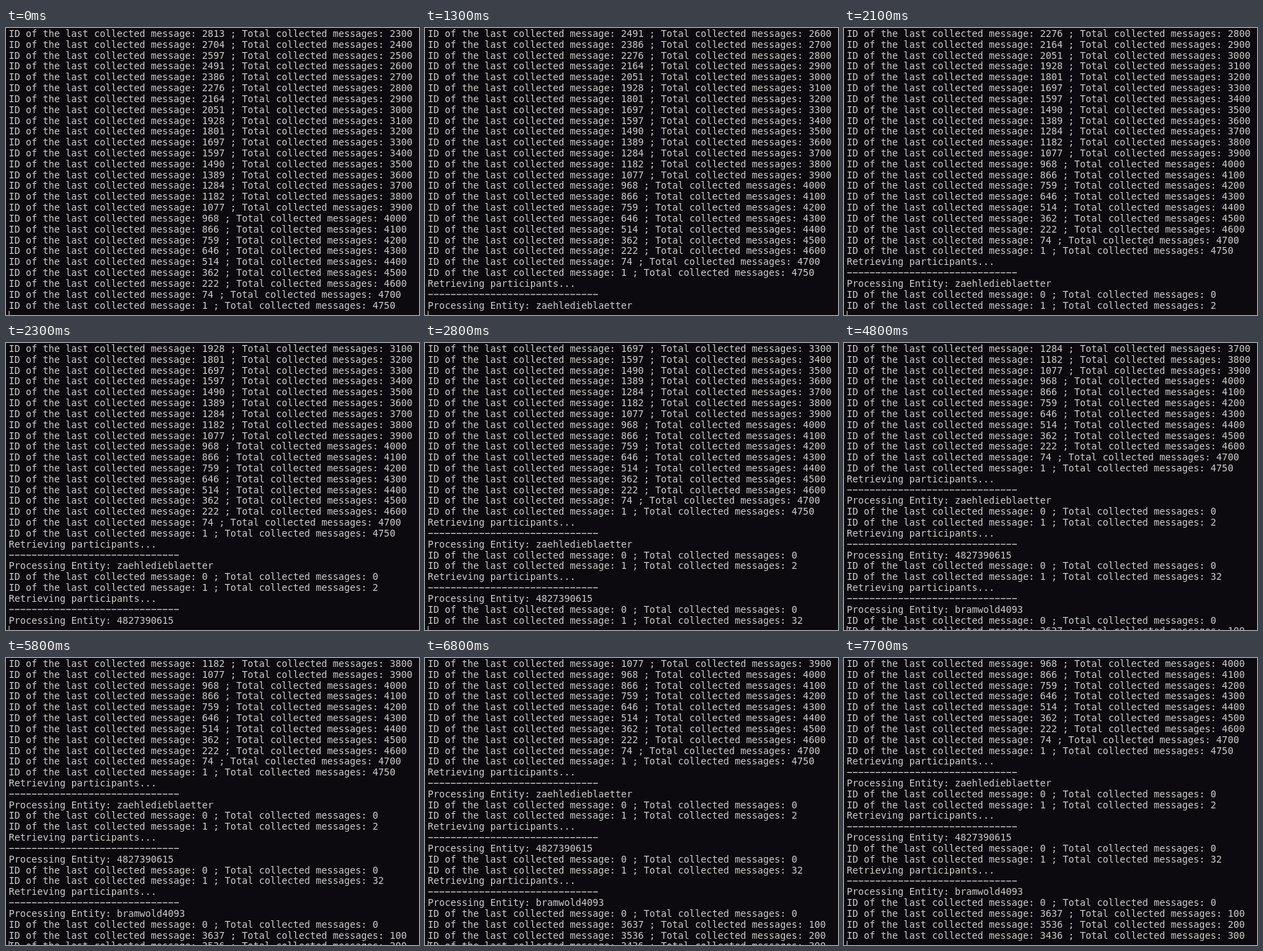
An HTML page with a canvas that plays this animation: 600x418 px, repeating every 8000 ms.

```html
<!DOCTYPE html>
<html lang="en">
<head>
<meta charset="utf-8">
<title>Message collector</title>
<style>
  html, body { margin: 0; width: 100%; height: 100%; overflow: hidden; background: #0c0a0e; }
  canvas { display: block; }
</style>
</head>
<body>
<canvas id="term" width="600" height="418"></canvas>
<script>
const ctx = document.getElementById('term').getContext('2d');
const LOOP = 8000, ROWS = 26;
const LEFT = 4, BASE = 13, PITCH = 15.82, CELL = 8.26;
const RULE = '-'.repeat(30);
const log = [];

// A line is printed below the last full row, then scrolled into view after `hold` ms.
function print(text, at = 0, hold = 0) {
  log.push({ text, at, shown: at + hold });
}

function status(id, total, at, hold) {
  print(`ID of the last collected message: ${id} ; Total collected messages: ${total}`, at, hold);
}

function entity(name, at, ruleAt, nameAt, hold) {
  print('Retrieving participants...', at);
  print(RULE, ruleAt);
  print('Processing Entity: ' + name, nameAt, hold);
}

const history = '2813 2704 2597 2491 2386 2276 2164 2051 1928 1801 1697 1597 1490 ' +
  '1389 1284 1182 1077 968 866 759 646 514 362 222 74 1';
history.split(' ').forEach((id, i) => status(id, Math.min(2300 + i * 100, 4750)));

entity('zaehledieblaetter', 700, 1000, 1200, 100);
status(0, 0, 1800);
status(1, 2, 2000, 100);
entity('4827390615', 2200, 2300, 2300);
status(0, 0, 2400);
status(1, 32, 2800);
entity('bramwold4093', 3200, 3600, 3600);
status(0, 0, 3800, 200);
status(3637, 100, 4800, 400);
status(3536, 200, 5800, 500);
status(3436, 300, 6800, 900);

function drawRule(y) {
  for (let i = 0; i < RULE.length; i++) {
    ctx.fillRect(LEFT + i * CELL + 0.7, y - 5.2, 6.8, 1.3);
  }
}

function draw(t) {
  const top = log.filter(line => line.shown <= t).length - ROWS;
  const printed = log.filter(line => line.at <= t);
  ctx.fillStyle = '#0c0a0e';
  ctx.fillRect(0, 0, 600, 418);
  ctx.fillStyle = '#cccccc';
  ctx.font = '13.72px "DejaVu Sans Mono", "Noto Sans Mono", monospace';
  printed.slice(top).forEach(({ text }, row) => {
    const y = BASE + row * PITCH;
    if (text === RULE) drawRule(y);
    else ctx.fillText(text, LEFT, y);
  });
  // bar cursor
  ctx.fillRect(4, 412, 1, 6);
}

const start = performance.now();
function tick() {
  draw((performance.now() - start) % LOOP);
  requestAnimationFrame(tick);
}
tick();
</script>
</body>
</html>
```
